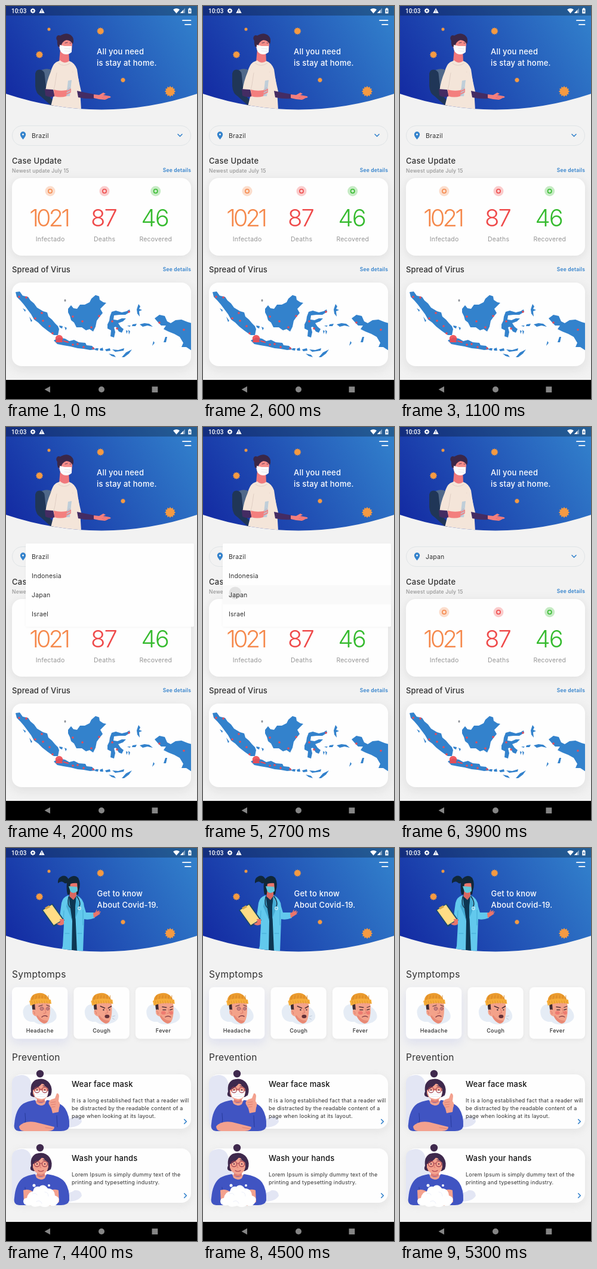
Write an HTML page with a canvas that moves like this. It is 320x658 px and loops after 5400 ms.

```html
<!DOCTYPE html>
<html lang="en">
<head>
<meta charset="utf-8">
<title>Health app</title>
<style>
html, body { margin: 0; width: 100%; height: 100%; overflow: hidden; background: #f2f2f2; }
canvas { display: block; width: 320px; height: 658px; }
</style>
</head>
<body>
<canvas id="stage"></canvas>
<script>
const W = 320, H = 658, LOOP = 5400, STEP = 100;
const BLUE = '#3382cc', INK = '#303030', GREY = '#959595', BG = '#f2f2f2';
const canvas = document.getElementById('stage');
const ctx = canvas.getContext('2d');
const dpr = window.devicePixelRatio || 1;
canvas.width = W * dpr;
canvas.height = H * dpr;

const clamp = v => Math.max(0, Math.min(1, v));
const span = (t, a, b) => clamp((t - a) / (b - a));

function shape(color, d) {
  ctx.fillStyle = color;
  ctx.fill(new Path2D(d));
}
function line(color, width, d) {
  ctx.strokeStyle = color;
  ctx.lineWidth = width;
  ctx.lineCap = ctx.lineJoin = 'round';
  ctx.stroke(new Path2D(d));
}
function disc(color, x, y, rx, ry = rx) {
  ctx.fillStyle = color;
  ctx.beginPath();
  ctx.ellipse(x, y, rx, ry, 0, 0, 7);
  ctx.fill();
}
function ring(color, width, x, y, r) {
  ctx.strokeStyle = color;
  ctx.lineWidth = width;
  ctx.beginPath();
  ctx.arc(x, y, r, 0, 7);
  ctx.stroke();
}
function rect(color, x, y, w, h) {
  ctx.fillStyle = color;
  ctx.fillRect(x, y, w, h);
}
function card(x, y, w, h, r, shadow, blur = 14, dy = 3) {
  ctx.save();
  ctx.shadowColor = shadow;
  ctx.shadowBlur = blur * dpr;
  ctx.shadowOffsetY = dy * dpr;
  ctx.fillStyle = '#fefefe';
  ctx.beginPath();
  ctx.roundRect(x, y, w, h, r);
  ctx.fill();
  ctx.restore();
}
function text(str, x, y, size, { weight = 400, color = INK, gap = 0.2, align = 'left', font = 'Inter' } = {}) {
  ctx.font = `${weight} ${size}px ${font}, "Open Sans", sans-serif`;
  ctx.letterSpacing = gap + 'px';
  ctx.textAlign = align;
  ctx.fillStyle = color;
  ctx.fillText(str, align === 'center' ? x + gap / 2 : x, y);
}

function virus(x, y, r) {
  ctx.fillStyle = '#f59a42';
  ctx.beginPath();
  for (let i = 0; i < 24; i++) {
    const q = i % 2 ? r * 0.74 : r, a = i * Math.PI / 12;
    ctx.lineTo(x + q * Math.cos(a), y + q * Math.sin(a));
  }
  ctx.fill();
}

function header(figure, lines, tx) {
  ctx.save();
  ctx.clip(new Path2D('M0 0H320V147Q160 200 0 147Z'));
  const g = ctx.createLinearGradient(320, 0, 0, 200);
  g.addColorStop(0, '#3383cd');
  g.addColorStop(1, '#11249f');
  rect(g, 0, 0, W, 200);
  [[72, 39, 3], [158.3, 42, 6.3], [56, 81.5, 6.3], [196, 124, 4.2], [275, 143, 9.2]].forEach(v => virus(...v));
  figure();
  ctx.restore();
  lines.forEach((s, i) => text(s, tx, 81 + i * 18.6, 13, { weight: 500, color: '#fff' }));
  line('#fff', 1.8, 'M296 24.2H309.5M300 31.2H309.5');
}

function worker() {
  shape('#50698a', 'M60 107Q70 103 78 108L76 130L64 140Z');
  shape('#203657', 'M49 113Q51 105 59 107Q65 109 65 117L68 146L84 164L78 169L58 151Q50 147 49 134Z');
  shape('#f0787c', 'M91 72H105L106 93Q99 101 89 93Z');
  shape('#f58d8a', 'M88 60Q93 53 102 53Q111 54 111 64L110 77Q103 83 95 80Q88 73 88 60Z');
  disc('#3a2748', 88.5, 54, 4.2, 5);
  shape('#3a2748', 'M87 68Q83 53 92 49Q102 43 110 50Q115 55 112 64Q108 57 101 57Q94 59 92 68Z');
  line('#3a2748', 0.8, 'M99 62L103 61M107 62L109 62');
  shape('#fbfbfc', 'M90 65L98 67L110 67L110 77Q104 83 96 80Q90 77 90 70Z');
  line('#d9dbe3', 0.6, 'M98 71L108 72M98 75L107 76');
  shape('#f4e5d9', 'M84 94L91 91Q98 98 106 92Q115 95 119 106L124 140L126 174L74 172L79 152Q68 152 66 143Q68 126 75 110Q78 98 84 94Z');
  line('#dccabf', 0.8, 'M85 112L82 132L78 148M112 110L117 132M88 96Q97 103 107 96');
  shape('#442c63', 'M65 139L79 140L82 151Q74 154 66 150Z');
  shape('#f37f7e', 'M80 140Q90 143 101 141L106 136Q111 138 108 145L101 151Q91 154 81 151Z');
  shape('rgba(183,202,218,.85)', 'M104 125L110 124L107 151L101 151Z');
  line('#f37f7e', 1.8, 'M102 143L108 140M102 147L108 144');
  shape('#f4e5d9', 'M113 104Q120 112 123 130L128 152L119 156L109 135Z');
  shape('#442c63', 'M119 142L133 145L149 148L148 155Q134 156 121 153Z');
  shape('#f37f7e', 'M147 148L156 149L163 145L167 147L163 149L174 151Q178 153 172 154L166 157Q157 157 147 154Z');
  line('#d85f6b', 0.6, 'M163 151L172 153M161 153L168 156');
}

function doctor() {
  shape('#102739', 'M104 51Q99 44 92 48Q86 51 87 59Q93 54 97 58Q100 61 104 57Z');
  shape('#102739', 'M103 53Q113 42 121 50Q126 59 122 72L121 78H103Q100 65 103 53Z');
  shape('#d96861', 'M108 69H118L118 84L112 89L106 83Z');
  shape('#e9756b', 'M107 56Q114 52 119 57L120 70Q115 77 109 73Q105 67 107 56Z');
  shape('#102739', 'M104 66Q104 52 114 50Q122 52 121 59Q113 58 108 60L107 66Z');
  shape('#62cadc', 'M105 64L119 65L120 72Q114 78 108 73Z');
  shape('#0d3652', 'M105 80L113 87L119 79L127 87L124 173H102Z');
  shape('#62c9ed', 'M105 79Q95 82 93 92L89 121L97 128L95 164L92 174H110L111 122L106 98Z');
  shape('#62c9ed', 'M118 79Q130 84 131 98L134 108L147 108L149 117Q139 121 131 119L129 174H119L116 105Z');
  shape('#45acd4', 'M105 81L101 98L111 122L107 95ZM118 80L124 97L116 119L116 98Z');
  line('#3ca3cd', 0.8, 'M97 105L96 129M129 104L129 129M99 143L106 143M120 143L127 143');
  line('#173047', 1.5, 'M105 82Q102 96 109 101M119 81Q126 91 123 98');
  ring('#d6eef7', 1.2, 123, 101, 2.3);
  shape('#e9756b', 'M146 109L151 107L157 104L155 108L158 110L152 114L147 117Z');
  line('#e9756b', 1.4, 'M150 109L152 104M152 110L158 107');
  shape('#1b496b', 'M60 104L78 93L98 121L80 132Z');
  shape('#ffdc85', 'M62 104L77 95L95 120L80 129Z');
  shape('#d3a74e', 'M65 100L72 96L74 99L67 103Z');
  shape('#e9756b', 'M90 119L97 119L97 127Q92 132 85 127L91 124Z');
}

function mapCard() {
  ctx.save();
  ctx.beginPath();
  ctx.roundRect(10, 463, 300, 140, 16);
  ctx.clip();
  const land = [
    'M16 479L23 478L28 485L37 487L41 493L47 498L52 505L62 511L69 513L71 520L77 525L82 531L87 536L89 541L87 551L80 551L70 544L61 537L54 530L47 525L42 516L36 508L30 500L24 493L18 487Z',
    'M80 560L89 555L99 557L106 561L114 559L122 563L133 564L135 568L144 569L150 575L141 576L130 574L120 573L108 570L96 568L86 566Z',
    'M104 507L109 501L113 506L119 507L124 500L132 500L140 496L143 490L150 484L156 486L157 492L163 496L168 497L163 502L158 507L162 514L157 520L152 527L150 537L146 545L140 541L134 543L127 538L118 538L114 530L109 526L107 519L104 513Z',
    'M174 520L177 512L184 510L194 513L202 511L207 508L208 512L200 517L190 517L181 518L180 525L187 526L194 523L201 523L196 528L188 531L192 537L197 541L194 547L189 545L184 537L181 538L183 546L181 555L175 553L176 543L170 540L170 533L173 527Z',
    'M249 523L257 517L266 519L270 528L276 531L284 526L294 525L304 529L311 531V577L302 571L294 571L297 564L291 554L282 549L272 545L264 541L268 535L260 535L255 530Z',
    'M219 508L222 499L225 503L223 507L228 509L223 511L224 520L220 515Z',
    'M224 533L232 531L240 532L246 537L237 535L229 537ZM212 533L219 532L217 536L211 536Z',
    'M150 573L155 573L154 577L149 576ZM157 574L162 572L163 577L158 577ZM166 575L174 573L175 577L168 578ZM178 575L188 576L198 573L197 577L183 579ZM172 582L181 584L184 588L177 586ZM194 588L201 580L211 575L206 582L198 588Z',
    'M267 554L270 554L268 563L264 563ZM247 561L249 564L245 569ZM89 535L95 536L94 540L90 538ZM98 537L102 539L100 543ZM28 506L33 509L32 512ZM39 520L44 527L42 529ZM205 542L208 545L206 550ZM201 543L204 544L202 549ZM203 535L209 535L207 537Z'
  ];
  land.forEach(d => shape(BLUE, d));
  disc('#8b8f96', 99, 493, 1.5, 2);
  const spots = [[22, 487], [34, 488], [60, 514], [49, 523], [62, 527], [73, 536], [78, 548], [112, 520], [128, 528], [156, 519],
    [143, 538], [112, 567], [120, 566], [130, 571], [146, 573], [178, 528], [186, 540], [206, 512], [257, 530], [298, 542]];
  spots.forEach(([x, y]) => disc('#e94b57', x, y, 1.8));
  disc('rgba(239,75,80,.9)', 89, 557, 6.2);
  line('#e94b57', 2, 'M84 562L94 562M97 561L104 563');
  ctx.restore();
}

function home(country) {
  rect(BG, 0, 0, W, H);
  header(worker, ['All you need', 'is stay at home.'], 152);
  ctx.strokeStyle = '#e0e4e6';
  ctx.lineWidth = 1;
  ctx.beginPath();
  ctx.roundRect(10.5, 200.5, 299, 33, 16.5);
  ctx.stroke();
  shape(BLUE, 'M28.5 223.5Q23.8 218 23.8 215A4.7 4.7 0 0 1 33.2 215Q33.2 218 28.5 223.5Z');
  disc(BG, 28.5, 215, 1.6);
  text(country, 43, 220.7, 10.5);
  line(BLUE, 1.6, 'M288 214.8L291.5 218.3L295 214.8');

  const link = { weight: 600, color: BLUE, align: 'right' };
  text('Case Update', 10, 264, 13, { weight: 500, gap: 0.3 });
  text('Newest update July 15', 10, 278.6, 8.5, { weight: 500, color: GREY });
  text('See details', 310, 278, 8.5, link);
  card(10, 288, 300, 130, 16, 'rgba(150,150,150,.22)');
  const stats = [
    [74, '1021', 'Infectado', '#f5894c', 'rgba(245,137,76,.28)', -4],
    [165, '87', 'Deaths', '#ef4a4a', 'rgba(239,74,74,.28)', -2],
    [250.7, '46', 'Recovered', '#36bb2f', 'rgba(54,187,47,.28)', -2]
  ];
  for (const [x, n, label, color, soft, gap] of stats) {
    disc(soft, x, 310, 8.5);
    ring(color, 1.5, x, 310, 3.2);
    text(n, x - 0.5, 368.7, 40, { weight: 300, color, gap, align: 'center' });
    text(label, x, 394.4, 10.5, { color: GREY, align: 'center' });
  }
  text('Spread of Virus', 10, 445.5, 13, { weight: 500, gap: 0.1 });
  text('See details', 310, 444, 8.5, link);
  card(10, 463, 300, 140, 16, 'rgba(150,150,150,.22)', 18, 5);
  mapCard();
}

function menu(t) {
  const k = span(t, 1400, 1700);
  if (k <= 0 || t >= 3000) return;
  const size = span(k, 0.25, 0.5);
  ctx.save();
  ctx.globalAlpha = span(k, 0, 0.25);
  card(33, 195, 282, 42 + 97.5 * size, 2, 'rgba(0,0,0,.04)', 4, 1);
  const press = span(t, 2500, 2700);
  if (press > 0) {
    rect(`rgba(0,0,0,${0.02 * press})`, 33, 265, 282, 32);
    ctx.save();
    ctx.beginPath();
    ctx.rect(33, 265, 282, 32);
    ctx.clip();
    disc(`rgba(0,0,0,${0.09 * press})`, 54, 278, t < 2900 ? 4 + 6.5 * press : 60);
    ctx.restore();
  }
  ['Brazil', 'Indonesia', 'Japan', 'Israel'].forEach((s, i) => {
    ctx.globalAlpha = span(k, 0.5 + i * 0.08, 0.72 + i * 0.08);
    text(s, 43, 220.7 + i * 32, 10.5);
  });
  ctx.restore();
}

function patient(x, mood) {
  ctx.save();
  ctx.translate(x, 233);
  shape('#e5ecf5', 'M22 32Q32 24 46 33Q64 25 73 42Q79 55 64 60Q48 66 37 58Q22 59 19 46Q17 38 22 32Z');
  shape('#402c32', 'M33 25L41 26L42 42Q36 43 34 36Z');
  shape('#f3a28a', 'M38 25H63Q65 39 63 49Q61 61 54 61Q46 59 41 49Q34 48 34 40Q35 36 39 38Z');
  shape('#e88975', 'M43 47Q50 57 60 56Q57 62 52 60Q45 57 41 49Z');
  shape('#eb9b2e', 'M31 27Q29 12 44 10Q59 8 64 25Z');
  for (let i = 0; i < 6; i++) line('#cf7e22', 0.8, `M${36 + i * 5} 14L${34 + i * 5.4} 22`);
  shape('#f6ad3b', 'M29 23Q45 16 65 21L66 28Q47 24 31 31Z');
  for (let i = 0; i < 8; i++) line('#d98b29', 0.7, `M${33 + i * 4.2} 23L${34 + i * 4.2} 27`);
  line('#d97568', 0.9, 'M36 40Q39 42 38 45M55 36L57 43L53 44');
  if (mood === 0) {
    ring('#8e5061', 1, 50, 36, 2.8);
    ring('#8e5061', 1, 60, 36, 2.5);
    ring('#8e5061', 0.7, 50, 36, 1);
    ring('#8e5061', 0.7, 60, 36, 0.9);
    line('#56343a', 1.3, 'M45 32L51 30M58 30L63 32');
    line('#843f47', 1.5, 'M50 50Q54 46 59 49');
  } else if (mood === 1) {
    line('#56343a', 1.8, 'M45 32L52 35M58 35L63 32');
    disc('#40303a', 50, 38, 1.2);
    disc('#40303a', 60, 38, 1.1);
    disc('#633038', 56, 49, 4, 3);
    line('#b9c8d8', 1, 'M65 49L69 48M65 52L68 54');
  } else {
    disc('#ee7b70', 47, 43, 4, 3);
    disc('#ee7b70', 60, 43, 3, 3);
    line('#56343a', 1.3, 'M45 33L52 34M58 34L63 32M46 38L51 38M58 38L62 37');
    line('#843f47', 1.3, 'M50 50Q55 47 59 50');
  }
  ctx.restore();
}

function lady(y, masked) {
  ctx.save();
  ctx.translate(0, y);
  shape('#e3e6f4', 'M10 13Q11 2 26 1Q42 1 44 23L88 72Q104 78 115 70Q126 69 127 79Q122 90 96 89L24 93Q10 90 10 76Z');
  disc('#3f294d', 57, -1, 6.2);
  shape('#3f294d', 'M42 29Q40 14 50 9Q65 4 73 15Q79 24 75 35L70 38L46 38Q38 36 42 29Z');
  shape('#dd7c75', 'M53 36H65V47Q58 54 51 47Z');
  shape('#f3a18e', 'M45 20Q55 12 70 18L71 31Q69 42 59 44Q48 42 45 32Z');
  shape('#3f294d', 'M43 27Q43 12 57 10Q69 9 74 26Q66 21 61 14Q55 23 43 27Z');
  if (masked) {
    shape('#fff', 'M46 28L57 27L71 28L69 37Q60 45 49 38Z');
    line('#d9dbe8', 0.6, 'M51 33H66M52 37H65');
  } else {
    line('#ac434f', 1.2, 'M54 37Q58 40 63 37');
    line('#da7469', 0.9, 'M58 27L57 32L59 32');
  }
  ring('#a33e4c', 1.1, 52, 26, 4.6);
  ring('#a33e4c', 1.1, 65, 26, 4.6);
  line('#a33e4c', 1, 'M56.5 25H60.5');
  disc('#3f294d', 52, 26, 1.1);
  disc('#3f294d', 65, 26, 1.1);
  line('#3f294d', 1.1, 'M48 20L54 19M62 19L68 20');
  shape('#4054c2', 'M48 43Q58 52 69 43Q91 46 99 57Q107 69 106 87Q104 95 92 95H22Q12 94 14 83Q16 58 29 49Q36 45 48 43Z');
  shape('#f3a18e', 'M49 43Q58 53 68 43L65 50Q58 55 51 49Z');
  line('#273a9b', 1, 'M32 65Q34 76 31 87M85 69L86 88');
  if (masked) {
    shape('#f3a18e', 'M22 87Q31 77 49 80L81 88Q81 95 70 95H30Q22 94 22 87Z');
    line('#d9796c', 0.8, 'M66 89L79 91');
    shape('#f3a18e', 'M76 57L72 50Q70 45 76 42L82 40L85 32Q88 31 89 36L88 45Q92 49 89 56L88 63L78 65Z');
    line('#d9796c', 0.8, 'M75 47L83 46M75 51L83 50M76 55L82 54');
  } else {
    shape('#f3a18e', 'M29 70Q38 67 46 73L53 85L43 95L30 91ZM88 70Q78 66 69 74L63 85L74 96L89 90Z');
    shape('#fff', 'M35 83Q37 73 45 72Q47 62 56 64Q63 58 70 67Q81 67 82 79Q92 82 87 91Q82 99 73 95Q67 101 57 96Q46 100 42 95Q30 97 29 89Q29 83 35 83Z');
    line('#edf0fa', 1, 'M45 76Q50 73 52 78M65 73Q71 73 71 80M51 89Q57 85 60 92');
    disc('#fff', 47, 62, 2.5);
    disc('#fff', 72, 62, 2);
  }
  ctx.restore();
}

function advice(y, title, lines, masked) {
  card(10, y, 300, 91, 16, 'rgba(150,150,150,.16)', 14, 4);
  lady(y, masked);
  text(title, 110, y + 21, 13, { weight: 500, color: '#111' });
  lines.forEach((s, i) => text(s, 110, y + 47.4 + i * 12.8, 9));
  line(BLUE, 1.7, `M298.8 ${y + 75.5}L302.3 ${y + 79}L298.8 ${y + 82.5}`);
}

function info() {
  rect(BG, 0, 0, W, H);
  header(doctor, ['Get to know', 'About Covid-19.'], 152.5);
  text('Symptomps', 10, 217, 15.5, { gap: 0.4 });
  ['Headache', 'Cough', 'Fever'].forEach((s, i) => {
    const x = 10 + i * 103.4;
    if (i) card(x, 233, 93.3, 86.5, 8, 'rgba(150,150,150,.14)', 6, 2);
    else card(x, 233, 93.3, 86.5, 8, 'rgba(110,125,220,.16)', 16, 7);
    patient(x, i);
    text(s, x + 46.6, 308.6, 9, { weight: 500, gap: 0.3, align: 'center' });
  });
  text('Prevention', 10, 356, 15.5, { gap: 0.25 });
  advice(379, 'Wear face mask', [
    'It is a long established fact that a reader will',
    'be distracted by the readable content of a',
    'page when looking at its layout.'
  ], true);
  advice(503, 'Wash your hands', [
    'Lorem Ipsum is simply dummy text of the',
    'printing and typesetting industry.'
  ], false);
}

function system() {
  rect('rgba(0,0,0,.27)', 0, 0, W, 16);
  text('10:03', 9, 11.8, 10, { weight: 500, color: '#fff', gap: 0, font: 'Roboto' });
  ring('#fff', 2, 45, 8, 2.5);
  for (let i = 0; i < 8; i++) {
    const c = Math.cos(i * Math.PI / 4), s = Math.sin(i * Math.PI / 4);
    line('#fff', 1.4, `M${45 + 3 * c} ${8 + 3 * s}L${45 + 3.7 * c} ${8 + 3.7 * s}`);
  }
  shape('#fff', 'M60 3.6L64.7 12H55.3Z');
  rect('#27459a', 59.5, 6.5, 1, 2.6);
  rect('#27459a', 59.5, 9.9, 1, 1);
  shape('#fff', 'M280 6Q285.5 2 291 6L285.5 12.5Z');
  shape('rgba(255,255,255,.4)', 'M300 3.5V12H291.8Z');
  shape('#fff', 'M297 6.7V12H291.8Z');
  shape('#fff', 'M305.3 4.4H306.7V3.3H309.2V4.4H310.5V12.5H305.3Z');
  shape('#356caa', 'M308.4 5.8L306.4 9H307.6V11.2L309.6 8H308.4Z');

  rect('#000', 0, 626, W, 32);
  shape('#858585', 'M64.5 642L74 636.8V647.2Z');
  disc('#858585', 160, 642, 5);
  rect('#858585', 244.5, 637.2, 9.8, 9.8);
}

function draw(t) {
  ctx.setTransform(dpr, 0, 0, dpr, 0, 0);
  ctx.globalAlpha = 1;
  const k = span(t, 4100, 4400);
  if (k < 1) {
    home(t < 2900 ? 'Brazil' : 'Japan');
    menu(t);
  }
  if (k > 0) {
    const e = Math.pow(k, 0.8), rise = e * e * (3 - 2 * e);
    ctx.save();
    ctx.globalAlpha = k * (0.4 + 0.6 * k);
    ctx.translate(0, (1 - rise) * 626 * 0.25);
    info();
    ctx.restore();
  }
  system();
}

const start = performance.now();
function tick(now) {
  const t = Math.max(0, now - start) % LOOP;
  draw(Math.floor(t / STEP) * STEP);
  requestAnimationFrame(tick);
}
draw(0);
requestAnimationFrame(tick);
</script>
</body>
</html>
```
